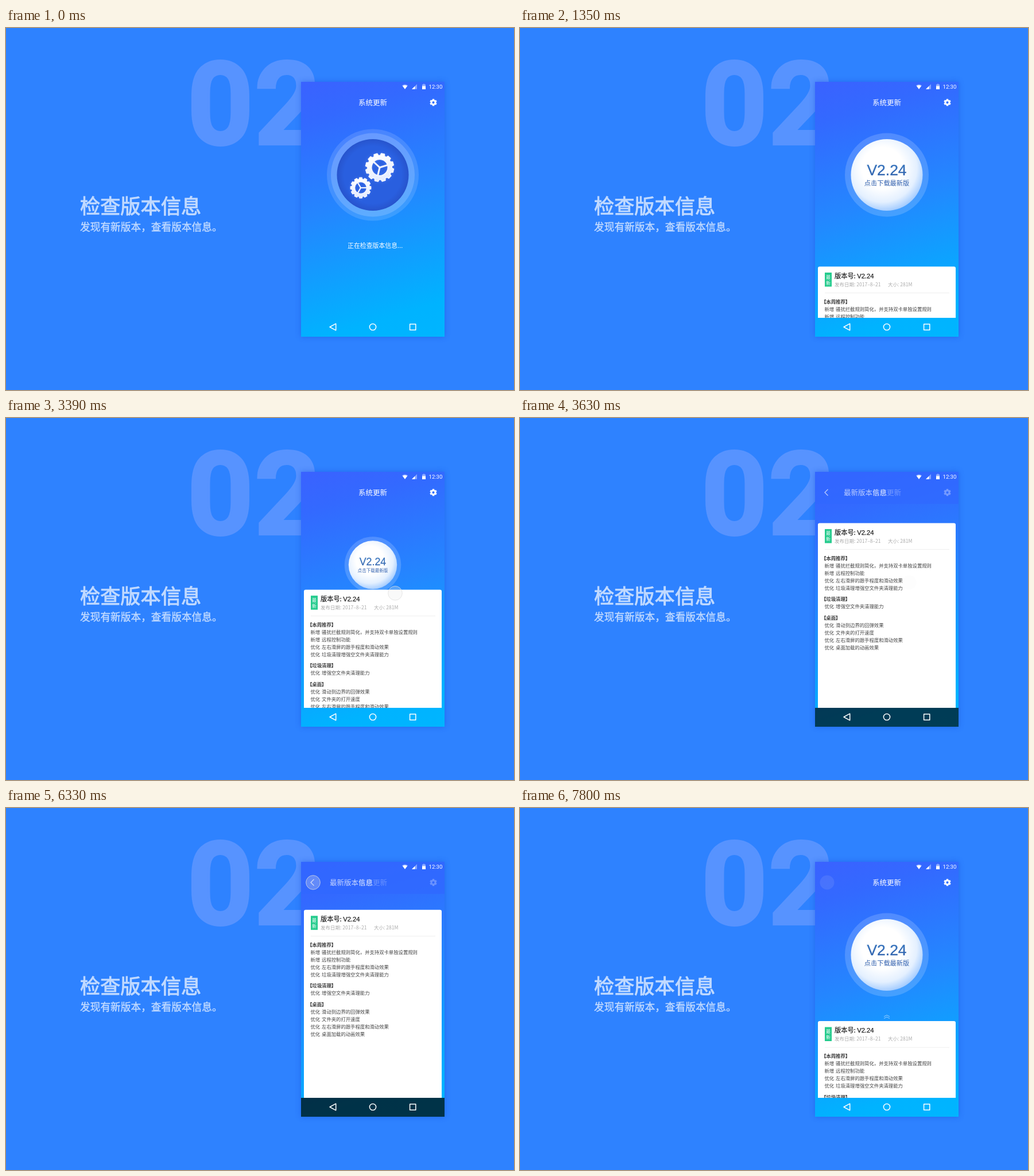
Recreate the animation shown at these times as an HTML page. Size 885 by 632 pixels, loop 7830 ms.

```html
<!DOCTYPE html>
<html lang="zh-CN">
<head>
<meta charset="utf-8">
<style>
  html, body { margin: 0; width: 100%; height: 100%; overflow: hidden; background: #2e82ff; }
  svg { display: block; }
  text { font-family: "Noto Sans CJK SC", "Noto Sans CJK", "Noto Sans SC", sans-serif; fill: #fff; }
  .latin { font-family: "Liberation Sans", Arial, sans-serif; }
  .phone { position: absolute; left: 514px; top: 94px; width: 250px; height: 445px;
    background: linear-gradient(163deg, #3a62ff 0%, #3369ff 14%, #2486ff 46%, #00b3ff 88%, #00b5ff 100%);
    box-shadow: 0 0 9px rgba(20, 75, 215, .45); }
  .layer { position: absolute; left: 0; top: 0; }
</style>
</head>
<body>
<svg class="layer" width="885" height="632" id="back"></svg>
<div class="phone"></div>
<svg class="layer" width="885" height="632" id="front"></svg>
<script>
const LOOP = 7830;
const $ = id => document.getElementById(id);
const clamp = v => Math.max(0, Math.min(1, v));
const mix = (a, b, k) => a + (b - a) * k;
const span = (t, from, to) => clamp((t - from) / (to - from));
const easeOut = k => 1 - (1 - k) ** 3;
const easeInOut = k => k < .5 ? 4 * k ** 3 : 1 - 4 * (1 - k) ** 3;

// y is the vertical middle of the characters
const label = (str, x, y, size, attrs = '') =>
  `<text x="${x}" y="${y + size * .38}" font-size="${size}" ${attrs}>${str}</text>`;

// medium weight: a thin outline around the regular face
const medium = (color, width) => `style="fill:${color};stroke:${color};stroke-width:${width}"`;

function gearPath(teeth, outer, root, hole) {
  const step = Math.PI * 2 / teeth, pts = [];
  for (let i = 0; i < teeth; i++)
    for (const [k, r] of [[-.34, root], [-.23, outer], [.23, outer], [.34, root]]) {
      const a = (i + k) * step;
      pts.push((r * Math.cos(a)).toFixed(2) + ' ' + (r * Math.sin(a)).toFixed(2));
    }
  return `M${pts.join('L')}ZM${hole} 0A${hole} ${hole} 0 1 0 ${-hole} 0A${hole} ${hole} 0 1 0 ${hole} 0Z`;
}

const wheel = (id, x, y, scale) => {
  const spokes = [0, 120, 240].map(a => `<path d="M0 0H15" transform="rotate(${a})"/>`).join('');
  return `<g transform="translate(${x} ${y}) scale(${scale})" filter="url(#glow)"><g id="${id}">
    <path d="${gearPath(12, 24.6, 21.2, 14.3)}" fill="url(#metal)" fill-rule="evenodd"
      stroke="#f3f6ff" stroke-width="1.6" stroke-linejoin="round"/>
    <g stroke="#f3f6ff" stroke-width="3">${spokes}</g></g></g>`;
};

const notes = [
  [61, '【本周推荐】'],
  [74, '新增 骚扰拦截规则简化，并支持双卡单独设置规则'],
  [87, '新增 远程控制功能'],
  [100, '优化 左右滑屏的跟手程度和滑动效果'],
  [113, '优化 垃圾清理增强空文件夹清理能力'],
  [132.5, '【垃圾清理】'],
  [145.5, '优化 增强空文件夹清理能力'],
  [165, '【桌面】'],
  [178, '优化 滑动到边界的回弹效果'],
  [191, '优化 文件夹的打开速度'],
  [204, '优化 左右滑屏的跟手程度和滑动效果'],
  [217, '优化 桌面加载的动画效果']
].map(([y, str]) => str[0] === '【'
  ? label(str, 525, y, 8.4, medium('#222', .2))
  : label(str, 530.5, y, 8.35, 'word-spacing="1" style="fill:#444"')).join('');

$('back').innerHTML = `
  <text x="315.5" y="202.5" font-size="202" letter-spacing="1" style="font-family:Roboto,Arial,sans-serif;
    font-weight:700;fill:#5793ff;stroke:#5793ff;stroke-width:4">02</text>
  <g opacity=".7">
    ${label('检查版本信息', 129, 310.5, 35.2, medium('#fff', 1))}
    ${label('发现有新版本，查看版本信息。', 129, 347.5, 17.7, medium('#fff', .4))}
  </g>`;

$('front').innerHTML = `
  <defs>
    <clipPath id="screen"><path d="M514 94H764V506H514Z"/></clipPath>
    <radialGradient id="pearl" cx=".44" cy=".4" r=".64">
      <stop offset=".45" stop-color="#fff"/><stop offset=".75" stop-color="#e4f0ff"/>
      <stop offset="1" stop-color="#96c4ff"/>
    </radialGradient>
    <linearGradient id="metal" x2="0" y2="1">
      <stop stop-color="#fff"/><stop offset="1" stop-color="#e3ebff"/>
    </linearGradient>
    <linearGradient id="ink" x2="0" y2="1">
      <stop stop-color="#3f82c8"/><stop offset="1" stop-color="#2d5aa6"/>
    </linearGradient>
    <radialGradient id="well">
      <stop offset=".8" stop-color="#295fdf"/><stop offset="1" stop-color="#2754cd"/>
    </radialGradient>
    <filter id="glow" x="-30%" y="-30%" width="160%" height="160%">
      <feDropShadow dx="0" dy="0" stdDeviation="3" flood-color="#5c8dff" flood-opacity=".5"/>
    </filter>
  </defs>
  ${label('系统更新', 639, 130, 12.5, 'text-anchor="middle"')}
  <path d="${gearPath(6, 6.2, 4.7, 2.2)}" transform="translate(744.5 130) rotate(30)" fill="#fff"
    fill-rule="evenodd" stroke="#fff" stroke-width=".3" stroke-linejoin="round"/>
  <g id="dial">
    <circle r="73" fill="#fff" opacity=".17"/>
    <g id="checking">
      <circle r="80" fill="#fff" opacity=".13"/>
      <circle r="62.5" fill="url(#well)"/>
      ${wheel('big', 12, -13, 1)}${wheel('small', -21, 22.5, .73)}
    </g>
    <g id="ready">
      <circle r="62.5" fill="url(#pearl)"/>
      <text class="latin" y="0" font-size="26.4" text-anchor="middle"
        style="fill:url(#ink);stroke:#3a70b8;stroke-width:.4">V2.24</text>
      ${label('点击下载最新版', 0, 14, 11.2, 'text-anchor="middle" style="fill:#2f5fae"')}
    </g>
  </g>
  <g id="status">${label('正在检查版本信息...', 595, 380, 10.9)}</g>
  <path id="hint" d="M634 364.2L639 361.6L644 364.2M634 367.4L639 364.8L644 367.4" fill="none" stroke="#fff" stroke-width=".8"/>
  <g clip-path="url(#screen)"><g id="card">
    <rect id="sheet" height="400" fill="#fff"/>
    <rect x="531" y="10.5" width="12" height="24.5" fill="#25cb8d"/>
    ${label('最', 537, 18, 8, 'text-anchor="middle"')}${label('新', 537, 28, 8, 'text-anchor="middle"')}
    <text x="548" y="20.2" font-size="11.2" ${medium('#222', .25)}>版本号: <tspan class="latin">V2.24</tspan></text>
    ${label('发布日期: 2017–8–21', 548, 31, 8.5, 'style="fill:#aaa"')}
    ${label('大小: 281M', 641, 31, 8.5, 'style="fill:#aaa"')}
    <path d="M531 46H748" stroke="#eee"/>
    ${notes}
  </g></g>
  <g id="detail">
    <rect x="514" y="94" width="250" height="56" fill="#3068ff"/>
    <rect x="514" y="506" width="250" height="33" fill="#000"/>
    <path d="M536.5 124.5L531 130L536.5 135.5" fill="none" stroke="#fff" stroke-width="1.3"/>
    ${label('最新版本信息', 564, 130, 12.5)}
  </g>
  <g fill="#fff">
    <path d="M690 100.2Q695 96.8 700 100.2L695 106.8Z" opacity=".45"/>
    <path d="M691 101.2Q695 98.6 699 101.2L695 106.8Z"/>
    <path d="M707 106.8L716 98V106.8Z" opacity=".4"/>
    <path d="M707 106.8L712.5 101.4V106.8Z"/>
    <path d="M725 98.5H726.8V97.4H729.2V98.5H731V102H725Z" opacity=".45"/>
    <path d="M725 101.5H731V107H725Z"/>
    <text x="736.5" y="106.2" font-size="9.6" style="font-family:Roboto,Arial,sans-serif">12:30</text>
  </g>
  <g fill="none" stroke="#fff" stroke-width="1.5" stroke-linejoin="round">
    <path d="M564 522L574.7 516.2V527.8Z"/>
    <circle cx="639" cy="522" r="5.6"/>
    <rect x="703.6" y="517" width="10.2" height="10.2"/>
  </g>
  <g id="touch">
    <circle r="12.5" fill="#ebebeb"/>
    <circle r="12.3" fill="none" stroke="#dedede" stroke-width=".9"/>
  </g>`;

const set = (id, attrs) => {
  for (const k in attrs) $(id).setAttribute(k, attrs[k]);
};

function touchAt(t) {
  if (t < 5160) {
    // arrives on an arc, then drags the card upward
    const k = easeInOut(span(t, 2460, 3000)), j = 1 - k;
    return [619 * j * j + 1550 * k * j + 678 * k * k,
      238 * j * j + 600 * k * j + 391 * k * k - 104 * span(t, 3260, 3420)];
  }
  const k = easeInOut(span(t, 5160, 5730));
  return [mix(678, 535, k), mix(287, 130, k)];
}

function draw(t) {
  const found = span(t, 1020, 1320);
  const enter = easeOut(span(t, 1150, 1800));
  const open = easeOut(span(t, 3305, 4005)) - easeOut(span(t, 6300, 7000));
  const detail = span(open, .55, 1), wide = span(open, .9, 1);

  const turn = t * .16;
  set('big', { transform: `rotate(${turn - 17})` });
  set('small', { transform: `rotate(${-turn})` });
  set('dial', { transform: `translate(639 256.5) scale(${1 - open})` });
  set('checking', { opacity: 1 - found });
  set('ready', { opacity: found });
  set('status', { opacity: 1 - found });
  set('hint', { opacity: .7 * span(t, 1600, 1850) * (1 - span(open, 0, .2)) });

  set('card', { transform: `translate(0 ${mix(mix(507, 372, enter), 149.5, open)})` });
  set('sheet', { x: 519 - 5 * wide, width: 240 + 10 * wide, rx: 3 * (1 - wide) });
  set('detail', { opacity: detail });

  const [x, y] = touchAt(t);
  const press = span(t, 3060, 3210) - span(t, 3420, 3600)
    + span(t, 5970, 6120) - span(t, 6400, 6600);
  const [fill, rim] = $('touch').children;
  set('touch', { transform: `translate(${x} ${y})`, opacity: span(t, 2460, 2700) });
  fill.setAttribute('opacity', mix(.1, .28, press));
  rim.setAttribute('opacity', .8 * press);
}

function tick(now) {
  draw(now % LOOP);
  requestAnimationFrame(tick);
}
draw(0);
requestAnimationFrame(tick);
</script>
</body>
</html>
```
